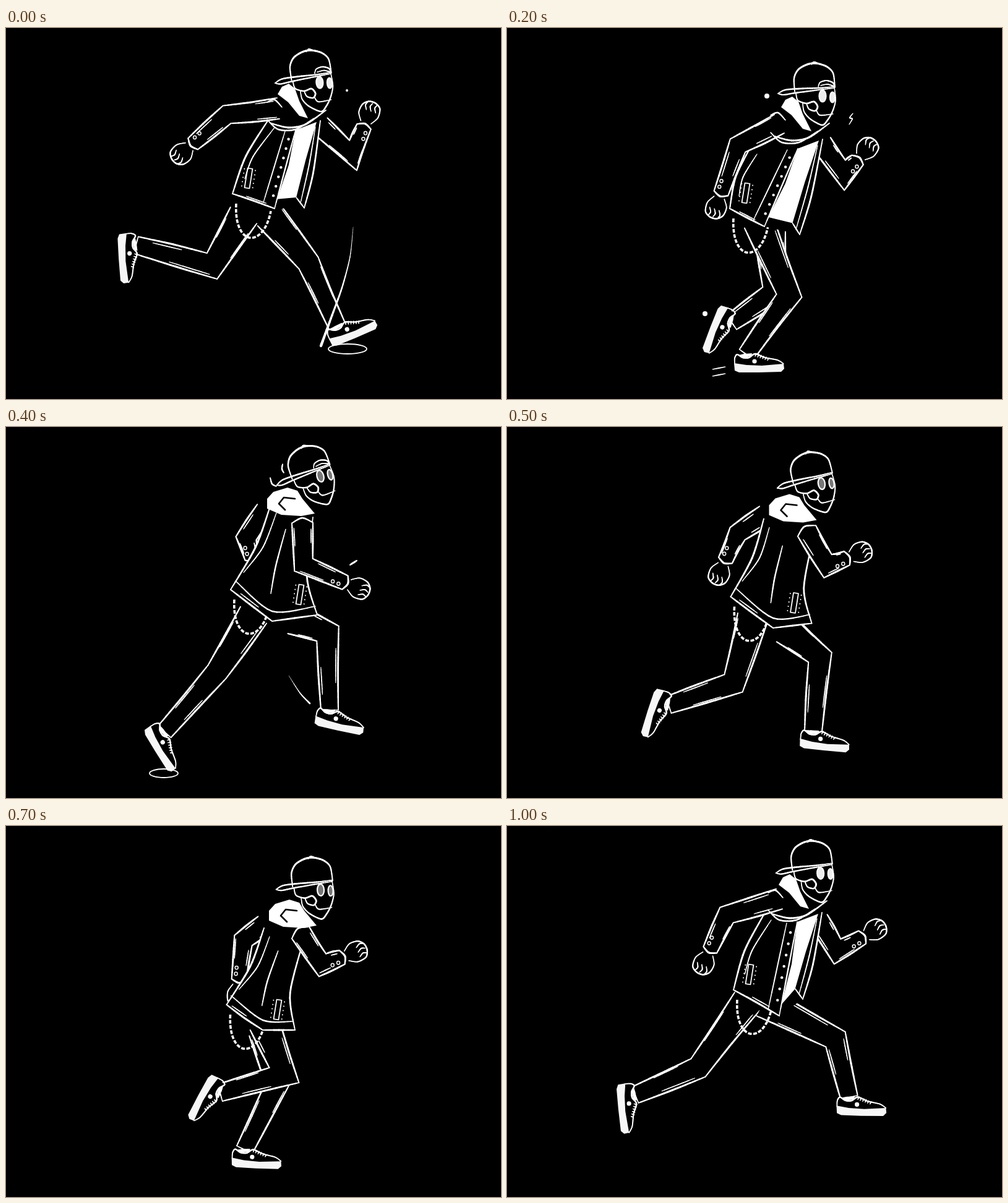
These frames come from a looping animation (800 px wide and 600 px high, 1100 ms). An HTML page with a canvas:

```html
<!DOCTYPE html>
<html lang="en">
<head>
<meta charset="utf-8">
<title>Runner</title>
<style>
html, body { margin: 0; width: 100%; height: 100%; overflow: hidden; background: #000; }
canvas { display: block; }
</style>
</head>
<body>
<canvas id="stage" width="800" height="600"></canvas>
<script>
const g = document.getElementById('stage').getContext('2d');
const STEP = 100, BEATS = 11;
g.lineCap = g.lineJoin = 'round';

let seed = 1;
const rand = (a, b) => {
  seed = (seed * 16807) % 2147483647;
  return a + (b - a) * seed / 2147483647;
};

// ---- points ----
const add = (p, x, y) => [p[0] + x, p[1] + y];
const mix = (a, b, t) => Array.isArray(a) ? a.map((v, i) => mix(v, b[i], t)) : a + (b - a) * t;
const pts = s => s.split(' ').map(p => p.split(',').map(Number));
const from = (o, s) => pts(s).map(p => add(o, ...p));
const dir = (a, b) => {
  const d = Math.hypot(b[0] - a[0], b[1] - a[1]) || 1;
  return [(b[0] - a[0]) / d, (b[1] - a[1]) / d];
};

// ---- brush ----
function trace(p, closed) {
  g.beginPath();
  p.forEach(q => g.lineTo(...q));
  if (closed) g.closePath();
}

function fill(p, color = '#fff') {
  trace(p, true);
  g.fillStyle = color;
  g.fill();
}

// Soft line through the points; width(t) shapes the pressure.
function brush(p, width) {
  const at = i => p[Math.max(0, Math.min(p.length - 1, i))];
  const n = (p.length - 1) * 8;
  const spot = k => {
    const i = Math.min(p.length - 2, Math.floor(k / 8)), t = k / 8 - i, u = 1 - t;
    const [a, b, c, d] = [at(i - 1), at(i), at(i + 1), at(i + 2)];
    return [0, 1].map(j => u * u * u * b[j] + 3 * u * u * t * (b[j] + (c[j] - a[j]) / 7)
      + 3 * u * t * t * (c[j] - (d[j] - b[j]) / 7) + t * t * t * c[j]);
  };
  g.strokeStyle = '#fff';
  for (let k = 0; k < n; k++) {
    g.lineWidth = width((k + 0.5) / n);
    trace([spot(k), spot(k + 1)]);
    g.stroke();
  }
}

const ink = (w, ...p) => brush(p, t => w * (0.6 + 0.4 * Math.sin(Math.PI * t)));
const slash = (w, s) => brush(pts(s), t => 0.4 + w * t);

// A bold line with a loose second pass beside it.
function sketch(a, b, side = 1, w = 3) {
  const d = dir(a, b), r = rand(2, 5) * side, t = rand(0.05, 0.4);
  ink(w, a, add(mix(a, b, 0.5), rand(-1, 1), rand(-1, 1)), b);
  const shift = p => add(p, -d[1] * r, d[0] * r);
  ink(1.8, shift(mix(a, b, t)), shift(mix(a, b, t + rand(0.3, 0.5))));
}

function oval(p, rx, ry, w = 2, color) {
  g.beginPath();
  g.ellipse(...p, rx, ry, 0, 0, 7);
  if (color) { g.fillStyle = color; g.fill(); }
  g.strokeStyle = '#fff';
  g.lineWidth = w;
  if (w) g.stroke();
}
const dot = (p, r) => oval(p, r, r, 0, '#fff');

function local(p, deg, draw) {
  g.save();
  g.translate(...p);
  g.rotate(deg * Math.PI / 180);
  draw();
  g.restore();
}

// ---- body parts ----
// Two outlines around a bent limb, mitred at the middle joint.
function limb(joints, widths) {
  const [a, b, c] = joints, d = dir(a, b), e = dir(b, c);
  const m = dir([0, 0], [d[0] + e[0], d[1] + e[1]]);
  const stretch = Math.max(0.6, m[0] * d[0] + m[1] * d[1]);
  const sides = [1, -1].map(s => [d, m, e].map((v, i) => {
    const r = s * widths[i] / (i === 1 ? stretch : 1);
    return add(joints[i], -v[1] * r, v[0] * r);
  }));
  fill([...sides[0], ...sides[1].slice().reverse()], '#000');
  sides.forEach((q, i) => {
    sketch(q[0], q[1], i ? 1 : -1);
    sketch(q[1], q[2], i ? 1 : -1);
  });
  return sides;
}

function shoe(ankle, deg) {
  local(ankle, deg, () => {
    g.translate(-20, 28);
    fill(pts('1,-14 5,-28 14,-24 32,-29 50,-23 72,-19 80,-13 40,-8'), '#000');
    ink(2.4, ...pts('1,-12 1,-22 5,-28 14,-23 24,-23 34,-29 50,-23 70,-19 80,-13'));
    fill(pts('7,-27 16,-29 29,-30 28,-25 15,-23'));
    for (let i = 0; i < 6; i++) ink(1.5, [36 + i * 4, -30 + i * 1.5], [34 + i * 4, -25 + i * 1.3]);
    dot([33, -17], 3.6);
    fill(pts('0,-14 20,-11 45,-10 80,-13 81,-5 76,0 40,1 8,1 1,-2'), '#f6f6f6');
  });
}

function leg([hip, knee, ankle], turn) {
  const [l, r] = limb([hip, knee, ankle], [25, 18, 14]);
  ink(2, l[2], r[2]);
  shoe(ankle, turn);
}

function arm([shoulder, elbow, hand], cap) {
  const d = dir(elbow, hand), n = [-d[1], d[0]];
  const wrist = add(hand, -d[0] * 24, -d[1] * 24);
  const [l, r] = limb([shoulder, elbow, wrist], [17, 15, 12]);
  const u = dir(elbow, shoulder);
  if (cap) ink(2.6, l[0], add(shoulder, u[0] * 8, u[1] * 8), r[0]);
  ink(3, l[2], add(wrist, d[0] * 5, d[1] * 5), r[2]);
  for (const k of [9, 19]) oval(add(wrist, n[0] * 6 - d[0] * k, n[1] * 6 - d[1] * k), 2.5, 2.7, 1.5);
  local(hand, Math.atan2(d[1], d[0]) * 180 / Math.PI, () => {
    const fist = pts('-17,-8 -5,-16 9,-15 17,-7 18,4 12,14 -3,16 -16,9');
    fill(fist, '#000');
    ink(2.4, ...fist);
    for (const y of [-8, 0, 8]) ink(1.9, [3, y + 2], [10, y - 2], [16, y]);
  });
}

function pocket(p) {
  local(p, 9, () => {
    g.lineWidth = 1.8;
    g.strokeRect(-4, -16, 8, 32);
    for (let y = -14; y <= 14; y += 7) for (const x of [-9, 9]) dot([x, y], 1);
  });
}

// Corners: left shoulder, left hem, hem middle, right hem, right shoulder.
function torso([a, b, c, d, e], open) {
  const bow = open ? -8 : 8;
  const left = add(mix(a, b, 0.5), bow, 0);
  const right = add(mix(e, d, 0.6), open ? 4 : -14, 0);
  fill([a, left, b, c, d, right, e], '#000');
  ink(3, a, left, b);
  ink(2.8, e, right, d);
  sketch(b, c, -1);
  ink(2, add(a, 9, 14), add(left, 12, 0), add(mix(a, b, 0.8), 8, 0));
  if (open) {
    const top = add(e, -40, 15);
    fill([top, add(e, -6, 2), add(mix(e, d, 0.45), -12, 0), add(mix(e, d, 0.88), -16, 0),
      mix(top, c, 0.88), add(mix(top, c, 0.45), 4, 0)]);
    ink(2.4, top, c);
    ink(2, add(top, -17, 2), add(c, -18, -10));
    for (let i = 0; i < 7; i++) dot(add(mix(top, c, 0.1 + i * 0.12), -8, 2), 2.2);
    ink(2.2, d, add(mix(e, d, 0.88), -16, 0));
    ink(2, add(e, -8, 10), add(mix(e, d, 0.5), -5, 0), add(d, -6, -8));
    pocket(add(b, 26, -25));
  } else {
    ink(2.8, c, d);
    ink(2.4, add(b, 8, -14), add(c, 0, -16), add(d, -3, -14));
    const mid = mix(a, e, 0.5);
    ink(2.4, add(mid, -10, 30), add(mix(mid, c, 0.5), -10, 0), add(mix(mid, c, 0.75), -10, 0));
    pocket(add(d, -28, -33));
  }
}

function hood(h, open) {
  if (open) {
    fill(from(h, '-55,31 -48,19 -37,14 -27,22 -20,42 -6,70 -20,66 -38,44'));
    ink(3, ...from(h, '-66,78 -38,85 -10,80 23,57'));
    ink(2.6, ...from(h, '-72,72 -54,88 -26,88 4,70'));
    ink(2.4, ...from(h, '-72,44 -60,40 -48,52'));
  } else {
    fill(from(h, '-71,62 -71,46 -61,35 -38,28 -22,33 -14,46 6,70 -16,74 -48,72'));
    g.lineWidth = 2.6;
    g.strokeStyle = '#000';
    trace(from(h, '-42,64 -52,54 -44,44 -26,46'));
    g.stroke();
  }
}

function head([x, y, tilt], beat, open) {
  local([x, y], tilt, () => {
    const dome = pts('-33,6 -34,-16 -27,-30 -13,-38 1,-40 18,-35 29,-24 32,-1');
    const jaw = pts('31,-1 33,20 28,38 20,52 11,60 -8,50 -18,38 -20,24');
    fill([...dome, ...jaw], '#000');
    ink(3, ...dome);
    ink(2.4, ...jaw);
    ink(2, ...pts('-6,-38 -2,-42 5,-40'));
    ink(2.6, ...pts('-60,9 -48,3 -23,1 6,0 31,-2'));
    ink(2.4, ...pts('-60,9 -51,11 -32,8 6,3 31,0'));
    if (beat < 5) ink(2.2, ...pts('5,-2 8,-9 18,-12 28,-9 31,-3 20,-6 9,-4'));
    ink(2.6, ...pts('-31,8 -28,20 -14,25 -2,22 4,30 0,37 -10,34 -14,25'));
    ink(2, ...pts('2,36 8,44 29,42'));
    if (beat === 6) {
      oval([19, 13], 7, 11, 2.6);
      ink(2.6, [15, 7], [23, 19]);
      ink(2.6, [23, 7], [15, 19]);
    } else {
      oval([12, 13], 5.5, 9.5, 2.2, open ? '#eee' : '#777');
      oval([28, 15], 4, 8.5, 2.2, open ? '#eee' : '#777');
    }
  });
}

function chain(b) {
  g.strokeStyle = '#fff';
  g.lineWidth = 3.6;
  g.lineCap = 'butt';
  g.setLineDash([6, 2.5]);
  g.beginPath();
  g.moveTo(b[0] + 6, b[1] + 16);
  g.bezierCurveTo(b[0] + 2, b[1] + 85, b[0] + 50, b[1] + 90, b[0] + 62, b[1] + 28);
  g.stroke();
  g.setLineDash([]);
  g.lineCap = 'round';
}

// ---- key poses: head with tilt, torso corners, limbs from root to tip, shoe turns ----
const pose = (head, torso, near, far, legA, legB, turns) => ({
  head, turns, torso: pts(torso), near: pts(near), far: pts(far), legA: pts(legA), legB: pts(legB)
});
const keys = {
  0: pose([494, 76, -4], '425,147 366,268 434,292 482,291 508,150', '440,130 357,140 284,203', '508,158 561,206 587,137',
    '426,304 489,380 535,482', '384,303 333,385 210,351', [-22, 87]),
  1: pose([474, 98, -4], '406,170 344,286 402,316 456,316 492,165', '415,150 331,173 263,223', '486,178 538,222 553,150',
    '398,308 472,403 445,533', '367,300 374,434 247,412', [0, 150]),
  2: pose([498, 97, 0], '395,190 360,292 416,321 473,334 510,180', '440,155 373,190 338,290', '509,187 546,238 582,195',
    '407,314 456,433 387,528', '425,330 432,428 363,476', [0, 112]),
  4: pose([493, 70, -15], '428,125 363,263 430,314 503,304 496,146', '479,155 481,223 570,261', '420,135 388,180 405,235',
    '400,304 341,396 256,493', '465,311 520,334 523,458', [59, 13]),
  6: pose([496, 91, -3], '402,172 360,286 430,336 482,331 495,206', '490,181 556,227 573,145', '415,150 357,165 281,240',
    '394,312 391,433 266,406', '438,345 492,411 467,526', [158, 0]),
  8: pose([496, 91, -2], '432,158 353,292 400,324 452,329 470,152', '462,164 467,223 558,262', '420,170 410,205 467,305',
    '442,330 508,373 426,457', '397,322 384,425 304,521', [80, 7]),
  10: pose([494, 64, -3], '418,138 366,265 440,307 478,280 509,140', '440,118 355,144 318,222', '503,152 534,203 595,168',
    '388,284 309,391 207,435', '415,285 531,345 553,439', [85, 2])
};

function poseAt(beat) {
  if (keys[beat]) return keys[beat];
  const a = keys[beat - 1], b = keys[beat + 1], out = {};
  for (const k in a) out[k] = mix(a[k], b[k], 0.5);
  return out;
}

// Landing rings, motion lines and specks.
const marks = {
  0() {
    slash(4, '561,322 556,370 543,420 525,470 509,514');
    oval([552, 519], 31, 8, 1.8);
    dot([551, 101], 2);
  },
  1() {
    oval([467, 564], 51, 10, 1.3);
    ink(4, [319, 557], [333, 554]);
  },
  2() {
    dot([420, 110], 4);
    dot([320, 462], 4);
    ink(1.8, ...pts('559,138 554,145 558,147 553,156'));
    for (const y of [550, 561]) ink(1.8, [332, y + 2], [353, y - 2]);
  },
  4() {
    oval([255, 560], 23, 7, 1.8);
    ink(2.4, ...pts('427,82 430,92 437,96'));
    ink(2.4, ...pts('447,60 446,68 449,74'));
    ink(3, [556, 223], [567, 216]);
    slash(2.4, '457,402 475,430 491,447');
  },
  6() {
    ink(4.5, [536, 117], [531, 142]);
    dot([528, 150], 3);
    slash(2.6, '302,361 318,378 334,390');
  },
  8() {
    slash(6, '328,245 360,263 410,278 460,283 526,281');
  }
};

function draw(beat) {
  const p = poseAt(beat), open = beat < 3 || beat > 8;
  seed = 977 * (beat + 3);
  g.fillStyle = '#000';
  g.fillRect(0, 0, 800, 600);
  const legs = [[p.legA, p.turns[0]], [p.legB, p.turns[1]]];
  legs.sort((m, n) => m[0][1][0] - n[0][1][0]).forEach(l => leg(...l));
  chain(p.torso[1]);
  arm(p.far, false);
  torso(p.torso, open);
  arm(p.near, !open);
  hood(p.head, open);
  head(p.head, beat, open);
  if (marks[beat]) marks[beat]();
}

let shown = -1;
function frame(now) {
  const beat = Math.floor(now / STEP) % BEATS;
  if (beat !== shown) draw(shown = beat);
  requestAnimationFrame(frame);
}
frame(0);
</script>
</body>
</html>
```
